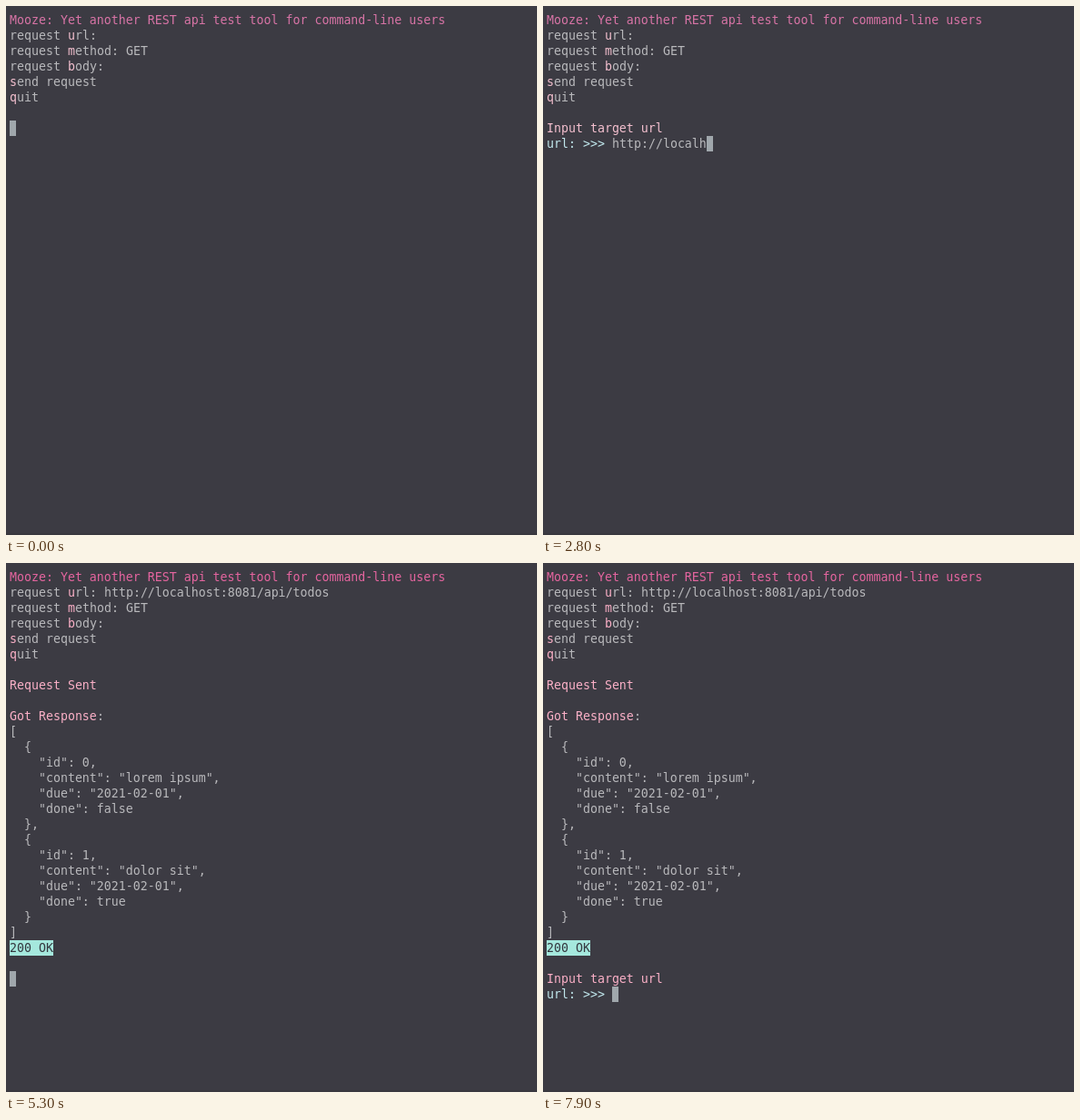
An HTML page with a canvas that plays this animation: 584x582 px, repeating every 8000 ms.

```html
<!DOCTYPE html>
<html lang="en">
<head>
<meta charset="utf-8">
<title>Terminal session</title>
<style>
html, body { margin: 0; width: 100%; height: 100%; overflow: hidden; background: #3c3b43; }
canvas { display: block; width: 584px; height: 582px; }
</style>
</head>
<body>
<canvas id="stage"></canvas>
<script>
const W = 584, H = 582, LOOP = 8000;
const LEFT = 4, TOP = 7, COL = 8, ROW = 17, BASE = 13;
const FONT = '13.288px "DejaVu Sans Mono", "Noto Sans Mono", monospace';
const BG = '#3c3b43', GRAY = '#b9b9bc', CYAN = '#c2e9ee', MINT = '#a5e8dd', CURSOR = '#a0a7ac';
const URL_TEXT = 'http://localhost:8081/api/todos';

// Moments at which the screen changes, in ms
const PROMPT = 500, ENTER = 5050, SEND = 5300, PROMPT_2 = 6900;
// Typing progress: [time, characters]
const TYPING = [[900, 1], [2150, 8], [3350, 18], [4550, 28], [4900, 31]];

const RESPONSE = JSON.stringify([
  { id: 0, content: 'lorem ipsum', due: '2021-02-01', done: false },
  { id: 1, content: 'dolor sit', due: '2021-02-01', done: true }
], null, 2).split('\n');

const canvas = document.getElementById('stage');
const ctx = canvas.getContext('2d');
const scale = window.devicePixelRatio || 1;
canvas.width = W * scale;
canvas.height = H * scale;

function write(row, col, text, color) {
  ctx.font = FONT;
  ctx.fillStyle = color;
  ctx.fillText(text, LEFT + col * COL, TOP + row * ROW + BASE);
}

function block(row, col, width, color) {
  ctx.fillStyle = color;
  ctx.fillRect(LEFT + col * COL, TOP + row * ROW, width, ROW);
}

function cursor(row, col) {
  block(row, col, 7, CURSOR);
}

// A menu line with one highlighted shortcut letter
function menuItem(row, text, key, pink) {
  write(row, 0, text.slice(0, key), GRAY);
  write(row, key, text[key], pink);
  write(row, key + 1, text.slice(key + 1), GRAY);
}

function menu(url, title, pink) {
  write(0, 0, 'Mooze: Yet another REST api test tool for command-line users', title);
  menuItem(1, 'request url: ' + url, 8, pink);
  menuItem(2, 'request method: GET', 8, pink);
  menuItem(3, 'request body:', 8, pink);
  menuItem(4, 'send request', 0, pink);
  menuItem(5, 'quit', 0, pink);
}

function prompt(row, typed, pink) {
  write(row, 0, 'Input target url', pink);
  write(row + 1, 0, 'url: >>>', CYAN);
  write(row + 1, 9, typed, GRAY);
  cursor(row + 1, 9 + typed.length);
}

function response(pink) {
  write(7, 0, 'Request Sent', pink);
  write(9, 0, 'Got Response', pink);
  write(9, 12, ':', GRAY);
  RESPONSE.forEach((line, i) => write(10 + i, 0, line, GRAY));
  block(24, 0, 6 * COL, MINT);
  write(24, 0, '200 OK', '#34383f');
}

function typedCount(t) {
  if (t < TYPING[0][0]) return 0;
  for (let i = 1; i < TYPING.length; i++) {
    const [t0, n0] = TYPING[i - 1], [t1, n1] = TYPING[i];
    if (t < t1) return Math.floor(n0 + (n1 - n0) * (t - t0) / (t1 - t0));
  }
  return URL_TEXT.length;
}

function draw(t) {
  ctx.setTransform(scale, 0, 0, scale, 0, 0);
  ctx.fillStyle = BG;
  ctx.fillRect(0, 0, W, H);
  ctx.fillStyle = '#38373e';
  ctx.fillRect(0, H - 2, W, 2);

  const entered = t >= ENTER;
  const pink = entered ? '#fbb0c7' : '#f4c0cf';
  menu(entered ? URL_TEXT : '', entered ? '#e5659f' : '#d874a6', pink);

  if (t < PROMPT) cursor(7, 0);
  else if (t < ENTER) prompt(7, URL_TEXT.slice(0, typedCount(t)), pink);
  else if (t < SEND) cursor(7, 0);
  else {
    response(pink);
    if (t < PROMPT_2) cursor(26, 0);
    else prompt(26, '', pink);
  }
}

const start = performance.now();
function frame() {
  draw((performance.now() - start) % LOOP);
  requestAnimationFrame(frame);
}
frame();
</script>
</body>
</html>
```
